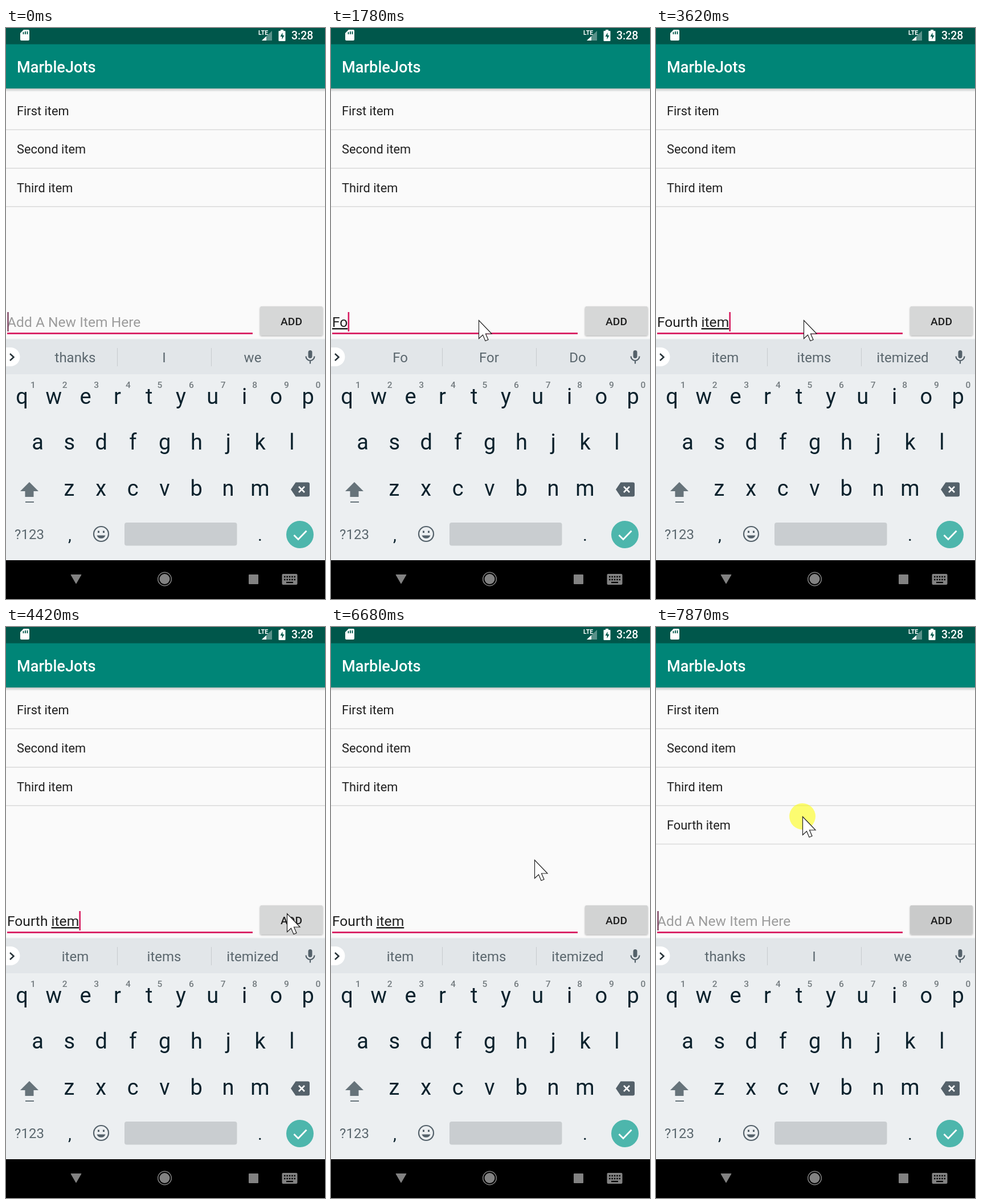
These frames come from a looping animation (560x1001 px, 8000 ms). An HTML page:

```html
<!DOCTYPE html>
<html lang="en">
<head>
<meta charset="utf-8">
<title>To-do list</title>
<style>
  html, body { margin: 0; width: 100%; height: 100%; overflow: hidden; background: #fafafa; }
  svg { display: block; width: 560px; height: 1001px; }
  text { font-family: Roboto, Arial, sans-serif; white-space: pre; }
  .mid { text-anchor: middle; }
  .medium { font-weight: 500; }
  .row { font-size: 21.8px; fill: #202020; }
  .field { font-size: 24.6px; }
  .word { font-size: 24px; fill: #5b676e; text-anchor: middle; }
  .key { font-size: 38px; fill: #0c222d; text-anchor: middle; }
  .digit { font-size: 15.5px; font-weight: 500; fill: #737b7f; text-anchor: middle; }
  .composing { text-decoration: underline; }
</style>
</head>
<body>
<svg viewBox="0 0 560 1001">
  <defs>
    <linearGradient id="shade" x2="0" y2="1">
      <stop stop-color="#000" stop-opacity=".22"/>
      <stop offset="1" stop-color="#000" stop-opacity="0"/>
    </linearGradient>
    <filter id="lift" x="-10%" y="-10%" width="120%" height="130%">
      <feDropShadow dx="0" dy="1.5" stdDeviation="1.4" flood-opacity=".32"/>
    </filter>
  </defs>
  <rect width="560" height="1001" fill="#fafafa"/>

  <!-- status bar and title -->
  <rect y="106" width="560" height="6" fill="url(#shade)"/>
  <rect width="560" height="106" fill="#008577"/>
  <rect width="560" height="28.5" fill="#00574b"/>
  <path d="M31 3h8q2 0 2 2v15q0 2-2 2H27q-2 0-2-2V9z" fill="#fff"/>
  <path d="M30.5 7v4M34 6v5M37.5 6v5" stroke="#00574b" stroke-width="1.8"/>
  <path d="M467 5v17h-18z" fill="#fff" opacity=".35"/>
  <path d="M457 14.5v7.5h-8z" fill="#fff"/>
  <text x="443" y="12" font-size="10.5" font-weight="700" fill="#fff" textLength="">LTE</text>
  <path d="M482 5v-2h5v2h2.500q1 0 1 1v16q0 1-1 1h-10q-1 0-1-1V6q0-1 1-1z" fill="#fff"/>
  <path d="M485.500 8l-4 7h3v5l4-7h-3z" fill="#00574b"/>
  <text x="501" y="20" font-size="19.500" class="medium" fill="#fff">3:28</text>
  <text x="19" y="78" font-size="27.200" class="medium" fill="#fff">MarbleJots</text>

  <g id="list"></g>

  <!-- entry field and button -->
  <text id="hint" class="field" x="2" y="524" fill="#9c9c9c">Add A New Item Here</text>
  <text class="field" x="2" y="524" fill="#202020"><tspan id="done"></tspan><tspan id="typing" class="composing"></tspan></text>
  <rect x="2" y="534" width="431" height="2.800" fill="#d81b60"/>
  <rect id="caret" y="498" width="2.600" height="34"/>
  <rect id="button" x="446" y="488" width="110" height="50.500" rx="2.500" filter="url(#lift)"/>
  <text x="501" y="520.500" font-size="19.200" class="mid medium" fill="#1e1e1e">ADD</text>

  <!-- keyboard -->
  <rect y="544.500" width="560" height="389" fill="#eceff1"/>
  <rect y="546" width="560" height="61" fill="#e2e6e9"/>
  <path d="M0 560h8a16.500 16.500 0 0 1 0 33H0z" fill="#fff"/>
  <path d="M7 571l6.500 6-6.500 6" fill="none" stroke="#263238" stroke-width="2.500"/>
  <path d="M195.500 561v32M360.500 561v32" stroke="#c6cbce"/>
  <g fill="none" stroke="#54616a" stroke-width="2.200">
    <rect x="530.500" y="565" width="7" height="14" rx="3.500" fill="#54616a" stroke="none"/>
    <path d="M526.500 575.500a7.500 7.500 0 0 0 15 0M534 583v5.500"/>
    <circle cx="167" cy="887" r="13"/>
    <path d="M159.500 889.500a8 8 0 0 0 15 0z" fill="#54616a" stroke="none"/>
    <path d="M162.500 881.500v3.500M171.500 881.500v3.500" stroke-width="3"/>
  </g>
  <g id="words"></g>
  <g id="keys"></g>
  <path d="M41 796l16 16h-8.500v10h-15v-10H25z" fill="#66737a"/>
  <path d="M34 831h15" stroke="#66737a" stroke-width="2"/>
  <path d="M500 809l8.500-12.500H530q3 0 3 3v19q0 3-3 3h-21.500z" fill="#54616a"/>
  <path d="M514 804l10 10M524 804l-10 10" stroke="#fff" stroke-width="2.600"/>
  <text x="41" y="896" class="word">?123</text>
  <rect x="208" y="867" width="197.500" height="40.500" rx="4" fill="#c9cdd0"/>
  <circle cx="516" cy="888" r="24" fill="#4db6ac"/>
  <path d="M505.500 889l7.500 7.500 14.500-15" fill="none" stroke="#fff" stroke-width="2.800"/>

  <!-- navigation bar -->
  <rect y="933" width="560" height="68" fill="#000"/>
  <g fill="#828282">
    <path d="M114 958.500h18l-9 15.500z" stroke="#828282" stroke-linejoin="round"/>
    <circle cx="278.500" cy="966" r="9"/>
    <circle cx="278.500" cy="966" r="11.800" fill="none" stroke="#828282" stroke-width="1.500"/>
    <rect x="426" y="958" width="17" height="17" rx="1"/>
    <rect x="484.500" y="957" width="27" height="19" rx="2"/>
  </g>
  <path d="M488 962h20M488 967h20" stroke="#000" stroke-width="2.500" stroke-dasharray="2.500 1.900"/>
  <path d="M492 972h12" stroke="#000" stroke-width="2.200"/>

  <g id="pointer">
    <circle id="click" r="23" fill="#ffff00" opacity=".55"/>
    <path d="M.5.500V32.500L7.500 26 12 36.500 17 34.500 12.500 24H23z" fill="#fff" stroke="#222" stroke-width="1.200"/>
  </g>
</svg>
<script>
const $ = id => document.getElementById(id);
const NS = 'http://www.w3.org/2000/svg';
document.querySelector('[textLength]').removeAttribute('textLength');

function add(parent, tag, attrs, content = '') {
  const el = document.createElementNS(NS, tag);
  for (const name in attrs) el.setAttribute(name, attrs[name]);
  el.textContent = content;
  parent.append(el);
  return el;
}

// list rows
const rows = ['First', 'Second', 'Third', 'Fourth'].map((name, i) => {
  const g = add($('list'), 'g', { transform: `translate(0 ${67.4 * i})` });
  add(g, 'text', { x: 19, y: 153, class: 'row' }, name + ' item');
  add(g, 'rect', { y: 177.6, width: 560, height: 1.5, fill: '#dadada' });
  return g;
});

// letter keys
const key = (x, y, c) => add($('keys'), 'text', { x, y, class: 'key' }, c);
[['qwertyuiop', 28, 659], ['asdfghjkl', 55.5, 739], ['zxcvbnm', 111, 820]].forEach(([letters, x, y]) =>
  [...letters].forEach((c, i) => key(x + 55.8 * i, y, c)));
[...'1234567890'].forEach((c, i) =>
  add($('keys'), 'text', { x: 47.5 + 55.6 * i, y: 631, class: 'digit' }, c));
key(112, 899, ',').style.fontSize = '30px';
key(446, 899, '.').style.fontSize = '30px';

const words = [121.5, 277.5, 433].map(x => add($('words'), 'text', { x, y: 586, class: 'word' }));

// [start, finished text, composing text, suggestions]
const entries = [
  [0, '', '', 'thanks I we'],
  [1580, '', 'F', 'F For Do'],
  [1780, '', 'Fo', 'Fo For Do'],
  [1980, '', 'Fou', 'Fou For Four'],
  [2200, '', 'Four', 'Four For Fourth'],
  [2400, '', 'Fourth', 'Fourth Forth Fourths'],
  [2800, 'Fourth ', '', 'Street of I'],
  [3200, 'Fourth ', 'i', 'I it in'],
  [3400, 'Fourth ', 'ite', 'ite item items'],
  [3620, 'Fourth ', 'item', 'item items itemized'],
  [6850, '', '', 'thanks I we']
];
const PINK = '#d81b60', MAUVE = '#86506c', OFF = 'none';
const carets = [[0, MAUVE], [200, PINK], [380, OFF], [760, PINK], [1180, OFF], [1580, PINK],
  [4020, OFF], [4420, PINK], [5040, OFF], [6850, MAUVE]];
const spots = [[0, -99, -99], [200, 370, 735], [380, 315, 620], [580, 259, 512], [4020, 335, 511],
  [4220, 435, 506], [4420, 493, 502], [5040, 527, 508], [5240, 493, 502], [6060, 410, 475],
  [6680, 357, 408], [6850, 310, 365], [7060, 257, 332]];
const clicks = [[0, false], [5650, true], [5850, false], [7870, true]];
const fills = [[0, '#d6d7d7'], [6680, '#d2d3d3'], [6850, '#c9caca']];

const at = (steps, t) => steps.findLast(step => step[0] <= t);

function draw() {
  const t = performance.now() % 8000;
  const [, done, typing, offers] = at(entries, t);
  $('done').textContent = done;
  $('typing').textContent = typing;
  $('hint').style.display = done + typing ? 'none' : '';
  offers.split(' ').forEach((word, i) => words[i].textContent = word);

  const length = done + typing ? $('done').parentNode.getComputedTextLength() : 0;
  $('caret').setAttribute('x', 2.2 + length);
  $('caret').setAttribute('fill', at(carets, t)[1]);

  const [, x, y] = at(spots, t);
  $('pointer').setAttribute('transform', `translate(${x} ${y})`);
  $('click').style.display = at(clicks, t)[1] ? '' : 'none';
  $('button').setAttribute('fill', at(fills, t)[1]);
  rows[3].style.display = t >= 6850 ? '' : 'none';
  requestAnimationFrame(draw);
}
draw();
</script>
</body>
</html>
```
